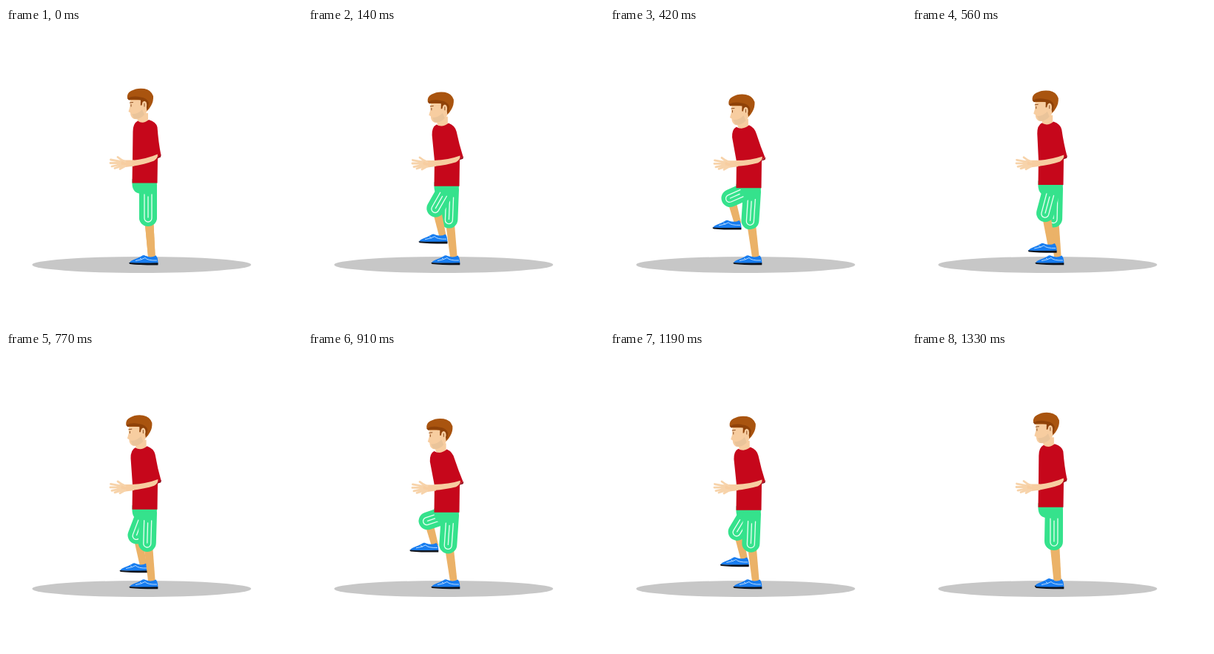
Write an HTML page that moves like this. It is 400x400 px and loops after 1.4 s.

```html
<!DOCTYPE html>
<html lang="en">
<head>
<meta charset="utf-8">
<title>Marching in place</title>
<style>
  html, body { margin: 0; width: 100%; height: 100%; overflow: hidden; background: #fff; }
  svg { display: block; width: 100vw; height: 100vh; }
  .skin { fill: #f7cda0; }
  .shirt { fill: #c6071b; }
  .shorts { fill: #35e28c; }
  .thigh { fill: none; stroke: #35e28c; stroke-width: 24; stroke-linecap: round; }
  .shin { fill: #ebb268; }
  .stripe { fill: none; stroke: #e9fff3; stroke-width: 1.3; stroke-linecap: round; }
  .fingers { fill: none; stroke: #f7d3aa; stroke-width: 2.8; stroke-linecap: round; }
  .hair { fill: #a9540f; }
  .fringe { fill: #8f4208; }
  .line { fill: none; stroke: #8a4a1c; stroke-width: 1; stroke-linecap: round; }
</style>
</head>
<body>
<svg viewBox="0 0 400 400">
  <defs>
    <g id="shoe">
      <path fill="#187df0" d="M167 317.500C168 313.500 177 312.500 183 308.500Q186 306.500 188.500 308Q196 311 202.500 307.500Q205.500 311 205.300 318.500Z"/>
      <path fill="#10141c" d="M166.500 317Q180 318 205.300 317.300V320.200Q180 320.300 168 319Q166.300 318.500 166.500 317Z"/>
      <path fill="none" stroke="#b9dcff" stroke-width="1" d="M175 314.500Q183 313.500 188 310.500Q191 314.500 204 314M181 311L184 313"/>
    </g>
    <g id="leg">
      <path class="shin"/>
      <use href="#shoe"/>
      <path class="thigh"/>
      <path class="stripe"/>
    </g>
  </defs>
  <ellipse cx="183.300" cy="320" rx="148" ry="11" fill="#c7c7c7"/>
  <g id="far"></g>
  <path id="pelvis" class="shorts" d="M170.500 204H204V210L198 224H182Q171 223 170.500 211Z"/>
  <g id="near"></g>
  <path id="neck" class="skin" d="M176 115H192V127Q184 131 178 126Z"/>
  <path id="shirt" class="shirt"/>
  <g id="arm">
    <path fill="#8d0715" d="M203 177L209.500 171L209 174.500Z"/>
    <path class="skin" d="M204.800 170.500Q206 175.500 200 179.500Q188 184 170 187V179Q190 177 204.800 170.500Z"/>
  </g>
  <g id="hand">
    <path class="skin" d="M173 178.500L160 178.500L152 179L150 185L158 188.500L173 186.500Z"/>
    <path class="fingers" d="M155 180.500L141.500 178M154 182.500L141 182.500M155 184.500L143 187M158 186L147 189.500M161 186.500L154 190.500M161 180.500Q155 178 151 174.500"/>
  </g>
  <g id="head">
    <path class="skin" d="M168.500 93Q167 101 167.500 106L165.500 113L168 114.500Q168 120 172 122.500Q181 125 187 118L193 109V93Z"/>
    <path fill="#eac49a" d="M170 116Q178 117 184 110L187 117Q181 124 173 122.500Z"/>
    <path class="hair" d="M164 95Q163 88 169 85Q177 80.500 187 82Q196 83.500 199 92Q199.500 99 196 105Q194 109 190.500 112L190 100L183 97Q172 97.500 166 97Z"/>
    <path class="fringe" d="M164 95Q172 91 182 93.500Q190 94 193 101Q193 107 190.500 112L189 101Q186 97 183.500 104.500H181.800L182 97.500Q172 95.500 166 97.500Z"/>
    <ellipse class="skin" cx="187" cy="104" rx="3.200" ry="5.300"/>
    <path class="line" d="M167.500 101L171.500 100.500M169 103.500V106M187 102V106"/>
  </g>
</svg>
<script>
  const LOOP = 1400, TICK = 70, SWAP = 650, END = 1345;
  const $ = id => document.getElementById(id);
  const set = (el, name, value) => el.setAttribute(name, value);
  const shift = (el, x, y) => set(el, 'transform', `translate(${x} ${y})`);
  const mix = (a, b, p) => a + (b - a) * p;

  function makeLeg(id) {
    const root = $(id);
    for (const part of $('leg').children) root.append(part.cloneNode(true));
    const [shin, shoe, thigh, stripe] = root.children;
    return { shin, shoe, thigh, stripe };
  }
  const near = makeLeg('near'), far = makeLeg('far');

  function drawLeg(leg, p, raised) {
    const hx = 192 - (raised ? 10 * p : 0), hy = 214 + 8 * p;
    const kx = 192 - (raised ? 43 * p - 10 * p * p : 3 * p);
    const ky = 256 + (raised ? -14 * p - 19 * p * p : 5 * p);
    const fx = raised ? -32.5 * p : 0, fy = raised ? -55.5 * p : 0;
    const ax = 197 + fx + (raised ? 4 * p : 0), ay = 311 + fy;
    set(leg.shin, 'd', `M${kx - 5} ${ky}H${kx + 7}L${ax + 4.8} ${ay}H${ax - 4.8}Z`);
    shift(leg.shoe, fx, fy);
    set(leg.thigh, 'd', `M${hx} ${hy}L${kx} ${ky}`);

    // Stripe is drawn upright at the knee, then turned towards the hip.
    const len = Math.hypot(hx - kx, hy - ky) * 0.74;
    const turn = Math.atan2(hx - kx, ky - hy) * 180 / Math.PI;
    set(leg.stripe, 'd', `M-5 ${-len}V1A5 5 0 0 0 5 1V${-len}M0 ${3 - len}V0`);
    set(leg.stripe, 'transform', `translate(${kx} ${ky}) rotate(${turn})`);
  }

  function drawShirt(p) {
    const pt = (x0, y0, x1, y1) => `${mix(x0, x1, p)} ${mix(y0, y1, p)} `;
    set($('shirt'), 'd',
      'M' + pt(178, 125.5, 169.5, 135) +
      'Q' + pt(185, 130.5, 178, 140) + pt(193, 124, 187, 132.5) +
      'Q' + pt(203, 127, 194.5, 136) + pt(204.5, 134, 197, 145) +
      'Q' + pt(206, 155, 203, 161) + pt(209.5, 172, 209.5, 175.5) +
      'L' + pt(205, 176, 205, 179) +
      'L' + pt(204.5, 209.5, 204.5, 217.5) +
      'L' + pt(170.5, 209.5, 170.5, 217.5) +
      'L' + pt(171, 178, 171, 181) +
      'L' + pt(171.5, 140, 164, 149) +
      'Q' + pt(171.5, 129, 163.5, 138) + pt(178, 125.5, 169.5, 135) + 'Z');
  }

  function draw(t) {
    const first = t < SWAP;
    const phase = first ? t / SWAP : Math.min(1, (t - SWAP) / (END - SWAP));
    const p = Math.pow(Math.max(0, Math.sin(Math.PI * phase)), 1.4);
    drawLeg(near, p, first);
    drawLeg(far, p, !first);
    drawShirt(p);
    shift($('pelvis'), 0, 8 * p);
    shift($('neck'), -6 * p, 9.3 * p);
    shift($('head'), -4.1 * p, 9.3 * p);
    shift($('hand'), 0, p);
    set($('arm'), 'transform', `rotate(${6 * p} 170 183)`);
  }

  function loop() {
    const t = performance.now() % LOOP;
    draw(Math.floor(t / TICK) * TICK);
    requestAnimationFrame(loop);
  }
  loop();
</script>
</body>
</html>
```
